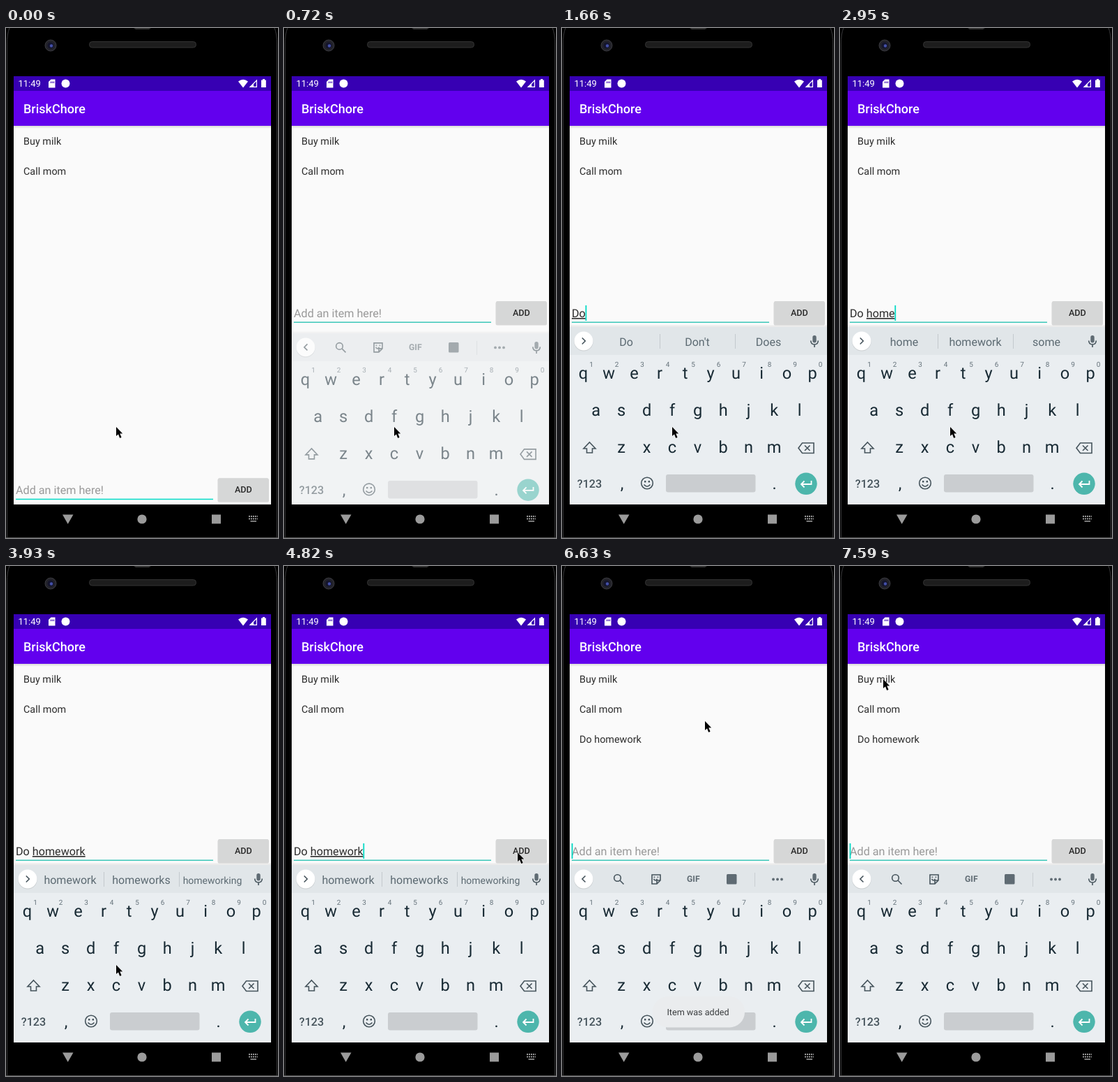
An HTML page for the animation above (7.99 s loop, 390 px wide and 730 px high).

```html
<!DOCTYPE html>
<html lang="en">
<head>
<meta charset="utf-8">
<title>To-do list demo</title>
<style>
html, body { margin: 0; width: 100%; height: 100%; overflow: hidden; background: #000; }
svg { display: block; width: 100%; height: 100%; }
text { font-family: Roboto, "Noto Sans", sans-serif; white-space: pre; text-rendering: geometricPrecision; }
.mid { text-anchor: middle; }
.item { font-size: 14.4px; fill: #2c2c2c; }
.field { font-size: 16.16px; }
.key { font-size: 23.6px; fill: #182a34; text-anchor: middle; }
.digit { font-size: 10px; fill: #66737b; text-anchor: middle; }
.word { font-size: 16px; fill: #5c6a72; text-anchor: middle; }
.line { fill: none; stroke: #46545c; stroke-width: 1.6; }
.tool { fill: #5f6b73; }
.composing { text-decoration: underline; text-decoration-thickness: 1px; text-underline-offset: 1px; }
</style>
</head>
<body>
<svg viewBox="0 0 390 730">
  <defs>
    <linearGradient id="shade" x2="0" y2="1">
      <stop stop-color="#000" stop-opacity=".14"/><stop offset="1" stop-color="#000" stop-opacity="0"/>
    </linearGradient>
    <clipPath id="screen"><path d="M11 69H380V682H11Z"/></clipPath>
  </defs>

  <!-- phone body -->
  <path d="M0 0H390V730H0Z"/>
  <path d="M5 0Q1.5 8 1.5 24V730M385 0Q388.5 8 388.5 24V730" fill="none" stroke="#3a3a3c"/>
  <path d="M183 0H208L205 2H186Z" fill="#333"/>
  <rect x="119.5" y="19.5" width="153" height="8.5" rx="4" fill="#1d1d1d" stroke="#333"/>
  <circle cx="64" cy="25" r="8" fill="#23232a" stroke="#3b3b40"/>
  <circle cx="64" cy="25" r="4.5" fill="#14152c"/>
  <circle cx="65" cy="25.5" r="2.2" fill="#4450a8"/>
  <path d="M0 729.5H390" stroke="#4a4a4a"/>

  <!-- app -->
  <path d="M11 140H380V682H11Z" fill="#fafafa"/>
  <path d="M11 140H380V144H11Z" fill="url(#shade)"/>
  <path d="M11 69H380V90H11Z" fill="#3700b3"/>
  <path d="M11 90H380V140H11Z" fill="#6200ee"/>
  <g fill="#fff">
    <text x="17.5" y="84.3" font-size="13">11:49</text>
    <path fill-rule="evenodd" d="M64.5 73.5H70.5V85.5H61V77ZM64 76.5V79H65V76.5ZM66 76.5V79H67V76.5ZM68 76.5V79H69V76.5Z"/>
    <circle cx="85.5" cy="79.5" r="6"/>
    <path d="M333 76.5Q340 71 347 76.5L340 85.5Z"/>
    <path fill-rule="evenodd" d="M360 73.5V85H348.5ZM358.8 76.4L355 80.2V83.8H358.8Z"/>
    <path d="M366 74.5H368V73H371V74.5H372.8V85H366Z"/>
    <text x="25" y="122" font-size="18" font-weight="500">BriskChore</text>
  </g>
  <text class="item" x="25" y="167">Buy milk</text>
  <text class="item" x="25" y="210">Call mom</text>
  <text class="item" id="added" x="25" y="253">Do homework</text>

  <!-- entry row -->
  <g id="row">
    <text class="field" id="hint" x="14" y="414" fill="#999">Add an item here!</text>
    <text class="field" x="14" y="414" fill="#2c2c2c"><tspan id="done"></tspan><tspan id="live" class="composing"></tspan></text>
    <path id="rule" d="M14 421.3H297" stroke-width="1.6"/>
    <path id="caret" d="M0 397V419" stroke="#03dac5" stroke-width="1.8"/>
    <rect x="303.5" y="391.5" width="73.5" height="34" rx="2.5" fill="#000" opacity=".14"/>
    <rect id="button" x="304" y="391" width="72.5" height="33" rx="2"/>
    <text class="mid" x="340.3" y="412" font-size="12.6" font-weight="500" fill="#2a2a2a">ADD</text>
  </g>

  <!-- keyboard -->
  <g clip-path="url(#screen)">
    <g id="board">
      <path d="M11 425.5H380V428.5H11Z" fill="#000" opacity=".06"/>
      <path d="M11 428H380V468H11Z" fill="#e1e6e9"/>
      <path d="M11 468H380V684H11Z" fill="#eaeef1"/>
      <circle cx="31" cy="449" r="13.6" fill="#000" opacity=".1"/>
      <circle cx="31" cy="448" r="13.4" fill="#fff"/>
      <path id="chevron" class="line"/>
      <g id="tools">
        <g class="line" stroke="#5f6b73">
          <circle cx="79.5" cy="446.5" r="4.8"/><path d="M83 450L88.5 455.5"/>
          <path d="M129 442H141V450L136 455H129ZM136 455V450H141M131.5 448Q134 452 136.5 448"/>
        </g>
        <path class="tool" d="M131.5 444.5h1.8v1.8h-1.8zM136.5 444.5h1.8v1.8h-1.8z"/>
        <text class="tool mid" x="188.3" y="452.3" font-size="12.2" font-weight="700">GIF</text>
        <rect class="tool" x="236" y="441" width="14.5" height="14.5" rx="1.5"/>
        <path d="M276.5 439V459" stroke="#c9ced2"/>
        <g class="tool"><circle cx="303" cy="448.5" r="1.9"/><circle cx="309" cy="448.5" r="1.9"/><circle cx="315" cy="448.5" r="1.9"/></g>
      </g>
      <g id="words">
        <path d="M140.5 438V459M248.5 438V459" stroke="#c3c9cd"/>
        <text class="word" x="92" y="455"></text>
        <text class="word" x="194" y="455"></text>
        <text class="word" x="296" y="455"></text>
      </g>
      <rect class="tool" x="359.3" y="440" width="5.4" height="10.5" rx="2.7"/>
      <path class="line" stroke="#5f6b73" d="M356.7 447.5Q357 453 362 453T367.3 447.5M362 453V457"/>
      <g id="keys"></g>
      <path class="line" d="M39.5 593L48 602H43.5V608H35.5V602H31Z"/>
      <path class="line" d="M344.5 594H361V608.5H344.5L339 601.2ZM348 597.5L355.5 605M355.5 597.5L348 605"/>
      <text class="mid" x="39.5" y="658" font-size="16.2" font-weight="500" fill="#46545c">?123</text>
      <circle class="line" cx="122" cy="651.5" r="8.3"/>
      <path class="line" d="M117.5 653.5Q122 659 126.5 653.5"/>
      <path d="M118 648h2.4v2.4h-2.4zM123.6 648h2.4v2.4h-2.4z" fill="#46545c"/>
      <rect x="149" y="639" width="128.5" height="25.5" rx="3" fill="#cacdd0"/>
      <circle cx="350" cy="652.3" r="15.7" fill="#4db6ac"/>
      <path d="M357.5 648V653H343.5M347.5 648.5L343 653L347.5 657.5" fill="none" stroke="#fff" stroke-width="1.8"/>
    </g>
  </g>

  <g id="toast">
    <rect x="130" y="616" width="132" height="44.5" rx="22" fill="#eaecee"/>
    <text class="mid" x="195" y="643" font-size="12.6" fill="#3a3d3f">Item was added</text>
  </g>

  <!-- navigation bar -->
  <g fill="#9b9b9b">
    <path d="M81 696.5H96.5L88.7 710Z"/>
    <circle cx="195" cy="703" r="6.6"/>
    <path d="M295 696.5H308V709.5H295Z"/>
    <path d="M348 699h13M348 702.5h13" stroke="#9b9b9b" stroke-width="2" stroke-dasharray="2 1"/>
    <path d="M350.5 706h8.5" stroke="#9b9b9b" stroke-width="1.6"/>
  </g>

  <path id="mouse" d="M0 0V13L3 10.4L5.2 16L7.6 15L5.3 9.6H9.2Z" stroke="#fff" paint-order="stroke"/>
</svg>
<script>
const LOOP = 7990;
const $ = id => document.getElementById(id);

const ticks = [0, 720, 840, 960, 1260, 1380, 1660, 2030, 2180, 2300, 2700, 2820, 2950, 3090,
  3210, 3330, 3480, 3930, 4070, 4190, 4310, 4430, 4550, 4670, 4820, 4970, 5090, 5240, 5370, 5510,
  5630, 5750, 6060, 6180, 6340, 6480, 6630, 6750, 6870, 6990, 7110, 7230, 7350, 7470, 7590];

// Time, entered text, suggestions (null shows the tool strip).
const typing = [
  [0, "", null],
  [1260, "D", ""],
  [1380, "D", "D|Do|Did"],
  [1660, "Do", "Do|Don't|Does"],
  [2030, "Do ", "you|not|we"],
  [2180, "Do h", "have|he|his"],
  [2300, "Do ho", "ho|how|homework"],
  [2700, "Do hom", "ho|how|homework"],
  [2820, "Do hom", "home|hom|homework"],
  [2950, "Do home", "home|homework|some"],
  [3090, "Do homew", "homew|homework|some"],
  [3210, "Do homewo", "homewo|homework|homeworld"],
  [3330, "Do homewor", "homewor|homework|homeworld"],
  [3480, "Do homework", "homework|homeworks|homeworking"],
  [5090, "", "homework|homeworks|homeworking"],
  [5510, "", ""],
  [5750, "", null]
];

// Time, x, y of the pointer.
const route = [
  [0, 158, 571], [3930, 158, 571], [4190, 200, 534], [4430, 280, 460], [4670, 335, 413],
  [4820, 335, 410], [5750, 335, 410], [6060, 346, 398], [6180, 346, 396], [6340, 345, 409],
  [6480, 269, 272], [6630, 205, 222], [6870, 120, 180], [7110, 70, 163], [7350, 62, 160],
  [7470, 62, 160], [7590, 62, 162], [LOOP, 62, 162]
];

const clamp = v => Math.max(0, Math.min(1, v));
const show = (id, on) => $(id).setAttribute("visibility", on ? "visible" : "hidden");
const move = (id, x, y) => $(id).setAttribute("transform", `translate(${x} ${y})`);

function addKey(cls, x, y, label) {
  const el = document.createElementNS("http://www.w3.org/2000/svg", "text");
  el.setAttribute("class", cls);
  el.setAttribute("x", x);
  el.setAttribute("y", y);
  el.textContent = label;
  $("keys").append(el);
}

function addRow(cls, chars, x, y) {
  [...chars].forEach((c, i) => addKey(cls, x + i * 36.5, y, c));
}

addRow("key", "qwertyuiop", 30.5, 502);
addRow("digit", "1234567890", 42, 484.6);
addRow("key", "asdfghjkl", 48.7, 555);
addRow("key", "zxcvbnm", 85, 608);
addKey("key", 86, 660, ",");
addKey("key", 304.5, 660, ".");

function pointer(t) {
  const i = route.findIndex(p => p[0] > t);
  const [t0, x0, y0] = route[i - 1], [t1, x1, y1] = route[i];
  const k = (t - t0) / (t1 - t0);
  return [x0 + (x1 - x0) * k, y0 + (y1 - y0) * k];
}

// Solid while typing, then blinking: 500 ms on, 500 ms off.
function caretOn(t) {
  if (t < 3480) return t >= 1260;
  return (t - 3430) % 1000 < 500 || t >= 5090 && (t - 4980) % 1000 < 500 && false;
}

function drawEntry(t) {
  const [, text, words] = typing.findLast(s => s[0] <= t);
  const cut = text.indexOf(" ") + 1;
  $("done").textContent = text.slice(0, cut);
  $("live").textContent = text.slice(cut);
  show("hint", !text);
  const width = text ? $("done").parentNode.getComputedTextLength() : 0;
  move("caret", 14.6 + width, 0);
  show("caret", caretOn(t));

  const tools = words === null;
  show("tools", tools);
  show("words", words);
  $("chevron").setAttribute("d", tools ? "M33.5 443.5L29 448L33.5 452.5" : "M28.8 443.5L33.3 448L28.8 452.5");
  const list = (words || "||").split("|");
  document.querySelectorAll(".word").forEach((el, i) => {
    el.textContent = list[i];
    el.style.fontSize = list[i].length > 10 ? "14px" : "";
  });
}

function draw(t) {
  const up = t >= 720;
  move("row", 0, up ? 0 : 253.2);
  $("rule").setAttribute("stroke", up ? "#3cc8b9" : "#03dac5");
  $("button").setAttribute("fill", t === 4970 ? "#c0c1c1" : t === 5090 ? "#cacbcb" : "#d6d7d7");

  const rise = up ? 1 - (1 - clamp((t - 600) / 360)) ** 2 : 0;
  $("board").setAttribute("opacity", rise);
  move("board", 0, 20 * (1 - rise));

  drawEntry(t);
  show("added", t >= 5240);
  $("toast").setAttribute("opacity", Math.min(clamp((t - 5120) / 500), clamp((7550 - t) / 400)));
  move("mouse", ...pointer(t));
}

let last = -1;
const start = performance.now();
function loop() {
  const t = (performance.now() - start) % LOOP;
  const tick = ticks.findLast(v => v <= t);
  if (tick !== last) draw(last = tick);
  requestAnimationFrame(loop);
}
draw(0);
loop();
</script>
</body>
</html>
```
